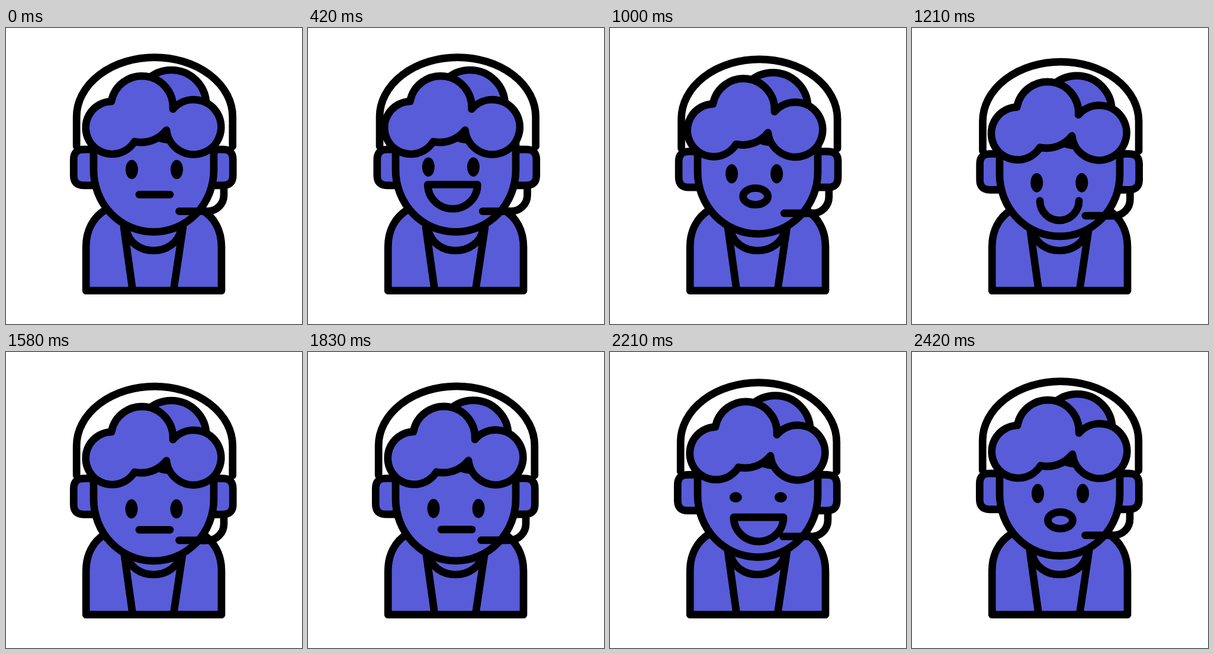
These frames come from a looping animation (500 px wide and 500 px high, 2.62 s). An HTML page:

```html
<!DOCTYPE html>
<html lang="en">
<head>
<meta charset="utf-8">
<title>Support agent</title>
<style>
  html, body { margin: 0; width: 100%; height: 100%; overflow: hidden; background: #fff; }
  svg { display: block; width: 100vw; height: 100vh; }
  .art { fill: #585cd9; stroke: #000; stroke-width: 12.7; stroke-linecap: round; stroke-linejoin: round; }
  .line { fill: none; }
  .eye { fill: #000; stroke: none; }
</style>
</head>
<body>
<svg viewBox="0 0 500 500">
  <g class="art">
    <g id="body">
      <path d="M135.2 443.7V370C135.2 342 147 320 168 307H331C352 320 364 342 364 370V443.7Z"/>
      <path class="line" d="M203 340C212 388 286 388 296 340M199 336L213.5 440M299 336L283.5 440"/>
    </g>
    <path id="band" class="line" d="M119.200 200V150A131.800 100.500 0 0 1 382.800 150V200"/>
    <g id="cups">
      <path class="line" d="M368 268V282A27.500 27.500 0 0 1 340.500 309.600H320"/>
      <path d="M160 205.200H131Q114.300 205.200 114.300 222V249Q114.300 265.800 131 265.800H160Z"/>
      <path d="M338 205.200H366.500Q383.300 205.200 383.300 222V249Q383.300 265.800 366.500 265.800H338Z"/>
    </g>
    <path id="head" d="M148 152V240A101.500 104.500 0 0 0 351 240V152Z"/>
    <g id="hair">
      <circle cx="279.300" cy="130" r="59"/>
      <path d="M178 124A52.500 52.500 0 0 1 282 137A46.300 46.300 0 1 1 271 172.500A54.500 54.500 0 0 1 217 192A44.500 44.500 0 1 1 178 124Z"/>
    </g>
    <g id="eyes">
      <ellipse class="eye" cx="212.500" cy="239" rx="10.500" ry="16.300"/>
      <ellipse class="eye" cx="288.500" cy="239" rx="10.500" ry="16.300"/>
    </g>
    <g id="mouth">
      <path class="line" d="M225 281.300H277"/>
      <path d="M209 274.500H293A42 41 0 0 1 209 274.500Z"/>
      <ellipse cx="250.500" cy="284.300" rx="21" ry="14"/>
      <path class="line" d="M217 276.500A33 33 0 0 0 283 276.500"/>
    </g>
    <path id="mic" class="line" d="M292.500 309.600H338"/>
  </g>
</svg>
<script>
const LOOP = 2620, FRAMES = 63, MOUTH_FRAMES = 9;
const get = id => document.getElementById(id);
const eyes = [...get('eyes').children];
const mouths = [...get('mouth').children];

// Offsets when the head is turned left and when it is nodding down
const poses = {
  band: { left: [2.2, 0], down: [0, 8.5] },
  cups: { left: [3, 0], down: [0, 8.5] },
  mic: { left: [3, 0], down: [0, 8.5] },
  head: { left: [0, 0], down: [0, 8.5] },
  hair: { left: [-6.7, 0], down: [0, 11] },
  eyes: { left: [-11, -5], down: [-0.5, 26] },
  mouth: { left: [-8, -12], down: [0, 19] }
};

function ease(f, from, to) {
  const u = Math.min(1, Math.max(0, (f - from) / (to - from)));
  return u * u * (3 - 2 * u);
}

function draw(time) {
  const f = Math.floor((time % LOOP + 5) * FRAMES / LOOP) % FRAMES;
  const nod = ease(f, 18, 32);
  const left = ease(f, 0, 13.5) * (1 - nod);
  const down = nod * (1 - ease(f, 42.5, 58));

  for (const id in poses) {
    const p = poses[id];
    const [x, y] = [0, 1].map(i => p.left[i] * left + p.down[i] * down);
    get(id).setAttribute('transform', `translate(${x.toFixed(2)} ${y.toFixed(2)})`);
  }

  const blink = ease(f, 47, 51) - ease(f, 51, 55);
  for (const eye of eyes) eye.setAttribute('ry', 16.3 * (1 - 0.92 * blink));

  const shown = Math.floor(f / MOUTH_FRAMES) % mouths.length;
  mouths.forEach((m, i) => m.setAttribute('visibility', i === shown ? 'visible' : 'hidden'));
}

const start = performance.now();
function tick() {
  draw(performance.now() - start);
  requestAnimationFrame(tick);
}
tick();
</script>
</body>
</html>
```
